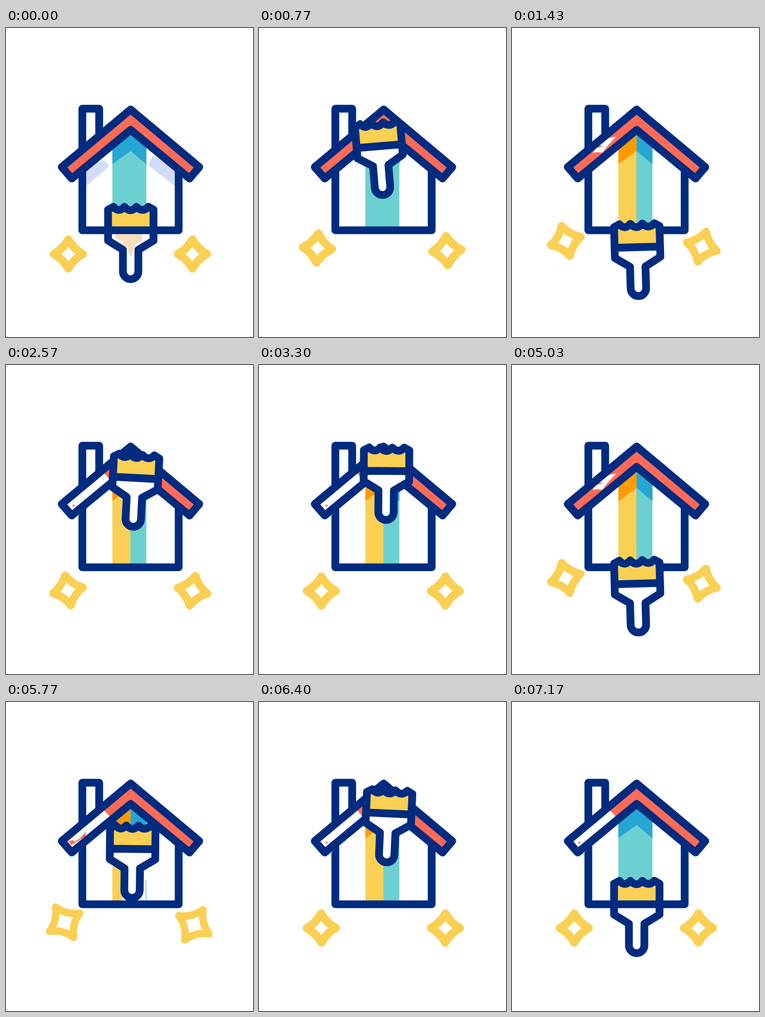
An HTML page for the animation above (7.21 s loop, 432 px wide and 540 px high).

```html
<!DOCTYPE html>
<html lang="en">
<head>
<meta charset="utf-8">
<title>House painting</title>
<style>
  html, body { margin: 0; width: 100%; height: 100%; overflow: hidden; background: #fff; }
  svg { display: block; width: 100vw; height: 100vh; }
  .line { fill: none; stroke: #002b7f; stroke-width: 13.6; stroke-linejoin: round; stroke-linecap: round; }
  .star { fill: none; stroke: #f9d054; stroke-linejoin: round; }
  .coral { fill: #ff6b57; }
  .teal { fill: #6dd0d0; }
  .blue { fill: #26a6d2; }
  .yellow { fill: #f9d054; }
  .orange { fill: #ff9a00; }
  .white { fill: #fff; }
  .shade { fill: #d3dcf6; }
</style>
</head>
<body>
<svg viewBox="0 0 432 540">
  <defs>
    <clipPath id="above"><rect id="aboveBox" x="180" width="72" height="400"/></clipPath>
    <clipPath id="below"><rect id="belowBox" x="180" width="72" height="400"/></clipPath>
  </defs>

  <g id="shadeFull" class="shade">
    <path d="M140 252L150 237L172 231L181 241L141 276Z"/>
    <path d="M256 224L265 226L296 250V277L249 240Z"/>
  </g>
  <path id="shadeBit" class="shade" d="M149 248L162 246L156 266L151 266L155 252Z"/>

  <!-- painted stripe -->
  <path class="teal" d="M186 180H245.5V347H186Z"/>
  <path class="blue" d="M186 180H245.5V238L218 215L186 238Z"/>
  <g id="leftPaint">
    <path class="yellow" d="M186 180H217.5V347H186Z"/>
    <path class="orange" d="M186 180H217.5V215L186 238Z"/>
  </g>
  <g class="white" clip-path="url(#below)">
    <path id="gapA" d="M185 100H247V280H245V310H244V347H212V318L197 314V281L185 275Z"/>
    <path id="gapB" d="M185 100H247V312H244V347H203V290L185 287Z"/>
  </g>

  <!-- house -->
  <path class="line" d="M133.5 225V141H163V190M133.5 245V353.5H302V245"/>
  <path class="coral" d="M218 142.5L338 243L321 263L218 178L115 263L97.5 243Z"/>
  <path id="patchSmall" class="white" d="M141 218L147 210L160 206L150 205L170 192L182 190L168 205L158 218L149 217Z"/>
  <g id="patchFull">
    <path class="white" d="M92 236L165 182L184 203L118 272L90 250Z"/>
    <path class="coral" d="M115 247L119 243L120 247Z"/>
    <path id="streak" class="coral" d="M110 244L116 241L120 244L130 238L140 226L139 235L126 243L114 250Z"/>
  </g>
  <path class="line" d="M218 142.5L338 243L321 263L218 178L115 263L97.5 243Z"/>

  <path id="starL" class="star"/>
  <path id="starR" class="star"/>

  <!-- brush, with the middle of the ferrule at 0,0 -->
  <g id="brush">
    <path class="white" d="M-39.5 0H40V18L13.5 34V72A13.5 13.5 0 0 1 -13.5 72V34L-39.5 18Z"/>
    <path id="beige" fill="#f6deb8" d="M-28 7H20V19L7 25L1 47L-4 40L-5 29L-14 25L-12 19L-25 15Z"/>
    <path class="yellow" d="M-39.5 0V-38H40V0Z"/>
    <path class="line" d="M-39.5 0V-36L-30 -41Q-21 -30 -11 -41Q0 -29 10 -41Q21 -30 31 -41L40 -36V18L13.5 34V72A13.5 13.5 0 0 1 -13.5 72V34L-39.5 18ZH40"/>
  </g>
</svg>
<script>
const PERIOD = 3605;
const $ = id => document.getElementById(id);

// Turning points as [time, value], joined by sine easing
const height = [[0, 0], [780, 147], [1560, -42], [2520, 156], [2970, 160], [3200, 211], [3540, 0]];
const tilt = [[0, 0], [525, -5], [2000, 0], [2570, 3], [3540, 0]];
const spin = [[0, 0], [525, 6], [2165, -31], [2850, 0]];
const drift = [[150, 0], [1480, 1], [2750, 0]];

function swing(points, t) {
  const i = points.findIndex(p => p[0] > t);
  if (i <= 0) return points.at(i)[1];
  const [t0, a] = points[i - 1], [t1, b] = points[i];
  return a + (b - a) * (1 - Math.cos(Math.PI * (t - t0) / (t1 - t0))) / 2;
}

// Four-pointed star that grows as it turns
function drawStar(id, x, y, angle) {
  const c = 9, turn = Math.abs(angle) / 31;
  const r = 25.3 + 5.5 * turn ** 1.5;
  const el = $(id);
  el.setAttribute("d", `M${r} 0Q${c} ${c} 0 ${r}Q${-c} ${c} ${-r} 0Q${-c} ${-c} 0 ${-r}Q${c} ${-c} ${r} 0Z`);
  el.setAttribute("transform", `translate(${x} ${y}) rotate(${angle})`);
  el.setAttribute("stroke-width", 14.5 - 1.5 * turn);
}

const show = (id, on) => $(id).setAttribute("visibility", on ? "visible" : "hidden");

function draw(t) {
  const up = swing(height, t);
  const x = 218 - 0.055 * up * Math.sin(2 * Math.PI * t / PERIOD);
  const y = 353.5 - up;
  $("brush").setAttribute("transform", `translate(${x} ${y}) rotate(${swing(tilt, t)})`);

  const angle = swing(spin, t), d = swing(drift, t);
  drawStar("starL", 109 - 15 * d, 395 - 23 * d, angle);
  drawStar("starR", 326 + 6 * d, 395 - 13 * d, -angle);

  const split = y - 20;
  $("aboveBox").setAttribute("y", split - 400);
  $("belowBox").setAttribute("y", split);

  // yellow arrives on the first down stroke and is covered on the second
  const clip = t < 1560 ? "url(#above)" : t < 3200 ? "none" : "url(#below)";
  $("leftPaint").setAttribute("clip-path", clip);
  show("leftPaint", t >= 780);

  show("gapA", t > 150 && t < 700);
  show("gapB", t > 1750 && t < 2380);
  show("shadeFull", t < 300);
  show("shadeBit", t >= 300 && t < 650);
  show("beige", t < 700);
  show("patchSmall", t >= 1350 && t < 1750);
  show("patchFull", t >= 1750);
  show("streak", t >= 1750 && t < 2350);
}

const start = performance.now();
function tick() {
  draw((performance.now() - start) % PERIOD);
  requestAnimationFrame(tick);
}
tick();
</script>
</body>
</html>
```
